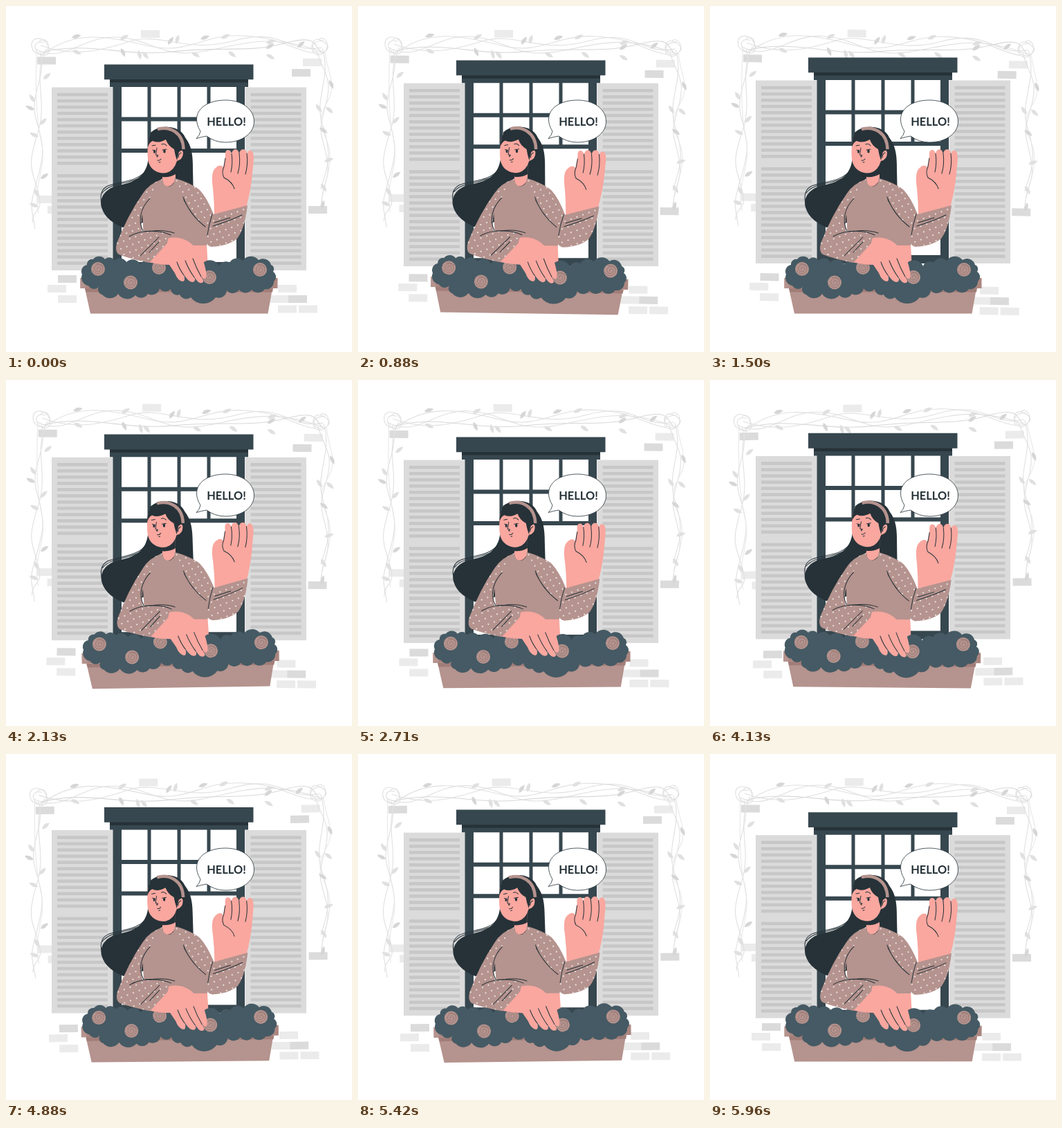
Animation, 500 px wide and 500 px high, one loop 6000 ms. Source, as an HTML page:

```html
<!DOCTYPE html>
<html lang="en">
<head>
<meta charset="utf-8">
<title>Hello from the window</title>
<style>
html, body { margin: 0; width: 100%; height: 100%; overflow: hidden; background: #fff; }
svg { display: block; width: 100vw; height: 100vh; }
.line { fill: none; stroke: #263238; stroke-width: 1; stroke-linecap: round; stroke-linejoin: round; }
.vine { fill: none; stroke: #e0e0e0; stroke-width: 1.1; }
.skin { fill: #f9a79f; }
.cloth { fill: #b5938e; }
.hair { fill: #263238; }
.frame { fill: #37474f; }
text { font: 700 16.4px Lato, "Open Sans", sans-serif; fill: #263238; text-anchor: middle; }
</style>
</head>
<body>
<svg viewBox="0 0 500 500">
  <defs>
    <pattern id="dots" width="14" height="12" patternUnits="userSpaceOnUse" patternTransform="rotate(20)">
      <g fill="#fff"><circle cx="3" cy="3" r=".95"/><circle cx="10" cy="9" r=".95"/></g>
    </pattern>
    <path id="leftSleeve" d="M226 250Q206 257 197 272Q176 302 160 343Q157 355 163 359Q181 366 207 371L233 343L236 329Q216 321 197 327Q191 305 207 279Z"/>
    <path id="rightSleeve" d="M243 249Q270 257 280 266Q291 278 300 301L349 288Q345 322 334 336Q321 347 297 348Q289 346 289 338L290 320Q269 306 257 277Z"/>
  </defs>

  <g id="wall">
    <g id="bricks"></g>
    <g class="vine">
      <path d="M44 63C85 83 109 44 158 45S225 76 283 66S380 38 455 66"/>
      <path d="M50 57C94 72 127 68 176 52S260 70 330 50S408 70 456 60"/>
      <path d="M59 66C100 37 142 42 203 57S282 40 342 43S410 63 445 68"/>
      <path d="M52 67C120 50 167 74 240 66S350 68 402 54S442 58 458 68" stroke="#d8d8d8"/>
      <path d="M48 51C58 43 66 58 58 66S37 68 37 56S55 43 61 58S50 75 44 65S46 50 55 53"/>
      <path d="M452 48C461 42 469 57 461 66S440 69 442 57S454 47 463 55S451 74 445 64S448 51 459 50"/>
      <path d="M49 66C60 104 32 127 44 166S55 216 44 255S37 288 42 322"/>
      <path d="M58 62C37 104 61 135 46 183S36 233 46 267S39 290 38 313"/>
      <path d="M44 62C43 111 42 157 51 196S38 256 47 300" stroke="#e8e8e8"/>
      <path d="M449 65C459 99 473 102 462 143S454 178 463 216S451 260 458 294"/>
      <path d="M457 61C471 105 444 132 458 174S465 233 455 264"/>
      <path d="M461 65C464 97 478 111 466 135S450 164 463 193S462 249 455 285" stroke="#e8e8e8"/>
    </g>
    <g id="leaves"></g>
  </g>

  <g id="window">
    <g id="shutters"></g>
    <path fill="#fff" d="M160 112h180v265H160z"/>
    <path class="frame" d="M142 84.4h215.5v21.8H142zM150 106h200v11H150zM154.500 116h12.500v266h-12.500zM333 116h12v266h-12zM160 370h180v12H160zM204.500 116h5v92h-5zM247.500 116h5v92h-5zM290.500 116h5v92h-5zM166 160.500h168v6H166zM166 206h168v6H166z"/>
    <path class="hair" d="M150 106h200v4.500H150z"/>
  </g>

  <g id="sway">
    <path class="hair" d="M209 183C221 171 251 171 259 190C269 203 270 217 270 236L271 281L224 300L177 323C155 316 142 305 138 291C134 276 145 263 163 259C191 254 204 243 206 218Z"/>
    <path class="line" d="M203 236C193 254 164 253 147 260C135 266 135 279 141 294M196 247C173 259 151 255 139 270"/>
    <path class="skin" d="M246 341L290 343L291.500 372H245zM226 232L245 228V251Q240 262 230 261Q226 257 226 250z"/>
    <path class="hair" d="M226 241Q239 241 245 228V243Q237 248 226 247z"/>
    <path class="cloth" d="M226 249Q226 260 235 261Q244 259 244 249Q271 256 284 272L300 302L290 346H232L199 335L196 282Z"/>

    <path class="skin" d="M206 193Q203 216 206 226C210 239 223 243 232 241Q243 238 247 224Q256 222 256 212Q255 206 249 208L247 184Q217 180 206 193z"/>
    <path class="hair" d="M205 204C205 189 211 177 227 175C250 173 258 188 258 210Q255 206 250 211L247 223Q244 214 243 207Q234 202 231 193Q220 199 212 195Q207 197 205 204z"/>
    <path fill="none" stroke="#b5938e" stroke-width="4.500" d="M219 178C237 173 256 183 256.500 207"/>
    <path class="line" d="M211 202L216 201M225 200Q229 198 232 202M218 205L216.500 215L220 216M219 223Q222 224 224 221M221 226L223 225.500M249 219Q249 214 253 212M212 208L216 209M226 208L232 207"/>
    <g class="hair"><ellipse cx="214.500" cy="210.500" rx="1.500" ry="2.300"/><ellipse cx="229" cy="210" rx="1.700" ry="2.500"/><path d="M217 217L220 216L219 219z"/></g>

    <path class="skin" d="M301 302Q301 282 299 263Q296 243 301 236Q309 227 314 233L317 217Q316 208 321 208Q325 208 326 214Q327 207 332 207Q336 208 337 214Q338 207 343 207Q348 208 348 214Q350 208 354 209Q358 210 358 221L355 252Q352 274 347 291z"/>
    <path class="line" d="M326 213Q328 227 325 240M337 213Q339 229 335 242M348 213Q350 229 346 243M317 220L315 232Q311 241 315 248Q327 254 330 264"/>
    <use href="#rightSleeve" class="cloth"/><use href="#rightSleeve" fill="url(#dots)"/>
    <path class="line" d="M256 276Q265 301 288 319M257 280Q264 294 271 302M298 301Q293 316 291 331M301 313L324 306M299 318Q322 311 341 302"/>

    <path fill="#ab8680" d="M107.500 393H392.500V408H107.500z"/>
    <path class="cloth" d="M107.500 393H115V408H385V408L378.500 444.400H122L114 408H107.500z"/>
    <path fill="#a17d78" d="M114 408H386L385 413.500H115.500z"/>
    <path id="bush" fill="#455a64"/>
    <g id="roses"></g>

    <path class="skin" d="M232 336Q251 331 266 342Q277 350 286 371Q291 388 289 393Q286 396 281 390Q288 399 283 400Q278 402 272 391Q275 399 269 399Q264 399 257 388Q260 398 255 398Q248 397 244 386L236 374Q223 374 205 370z"/>
    <path class="line" d="M247 370Q251 381 257 389M259 368Q264 381 272 392M270 365Q275 379 282 391"/>
    <use href="#leftSleeve" class="cloth"/><use href="#leftSleeve" fill="url(#dots)"/>
    <path class="line" d="M208 278C195 291 190 310 198 325M178 333Q192 325 212 325Q229 323 243 328M201 326Q224 324 238 331M194 361L221 334M207 356L221 341"/>
  </g>

  <path fill="#fff" stroke="#263238" stroke-width=".8" d="M281 181C265 155 286 136 317 136C341 136 358.500 149 358.500 167C358.500 184 341 197 317 197Q302 197 290 188Q283 189 275 191.500Q280 187 281 181z"/>
  <text x="318.500" y="172.800">HELLO!</text>
</svg>
<script>
const $ = id => document.getElementById(id);
const rect = (x, y, w, h, fill) => `<rect x="${x}" y="${y}" width="${w}" height="${h}" fill="${fill}"/>`;

const paleBricks = [[195, 35], [429, 76], [45, 274], [60, 289], [60, 403], [75, 418], [393, 403], [381, 418], [393, 432.5], [423, 432.5]];
const greyBricks = [[45, 73.5], [413, 91], [75, 389], [408, 418], [437, 289]];
const bricks = (list, fill) => list.map(([x, y]) => rect(x, y, 27, 11, fill)).join('');
$('bricks').innerHTML = bricks(paleBricks, '#ebebeb') + bricks(greyBricks, '#dbdbdb');

// Leaf stem position and direction in degrees
const leaves = [
  [95, 46, -15], [96, 64, 25], [165, 49, -30], [166, 61, 65], [191, 64, 75], [197, 66, 50], [234, 56, -55],
  [246, 55, -75], [268, 67, 30], [281, 48, -20], [311, 47, -25], [321, 66, 35], [376, 62, -35], [376, 54, -20],
  [376, 70, 30], [421, 60, -40], [54, 106, -40], [42, 139, -125], [41, 150, -155], [47, 189, -155], [49, 172, -45],
  [50, 250, -35], [47, 276, -115], [47, 290, -160], [467, 107, 65], [462, 146, 40], [456, 153, -125],
  [453, 176, 35], [460, 225, -20], [455, 257, 55], [456, 294, -75]
];
$('leaves').innerHTML = leaves.map(([x, y, a], i) =>
  `<path fill="${i % 3 ? '#e0e0e0' : '#d6d6d6'}" transform="translate(${x} ${y}) rotate(${a})" d="M0 0Q6 -6 14 0Q6 5 0 0"/>`).join('');

const shutter = x => {
  let s = rect(x, 117.5, 88.5, 264.5, '#dbdbdb');
  for (let i = 0; i < 28; i++) if (i !== 12) s += rect(x + 8, 125.8 + i * 9.02, 73, 4.6, '#c7c7c7');
  return s;
};
$('shutters').innerHTML = shutter(66) + shutter(345.5);

// Cusps of the foliage, joined by outward arcs
const cusps = [
  [110, 388], [117, 374], [126, 366], [143, 366], [157, 368], [174, 370], [194, 373], [215, 372], [239, 371],
  [262, 371], [285, 371], [308, 376], [323, 371], [342, 368], [365, 367], [383, 374], [386, 384], [387, 398],
  [374, 409], [355, 410], [337, 410], [319, 411], [303, 421], [267, 421], [251, 417], [238, 409], [222, 408],
  [205, 416], [187, 418], [162, 416], [139, 417], [134, 406], [119, 404]
];
$('bush').setAttribute('d', 'M' + cusps[0] + cusps.map((p, i) => {
  const q = cusps[(i + 1) % cusps.length];
  const r = Math.hypot(q[0] - p[0], q[1] - p[1]) * 0.62;
  return `A${r} ${r} 0 0 1 ${q}`;
}).join('') + 'Z');

$('roses').innerHTML = [[133, 380], [180, 399.5], [221, 378], [294, 392], [367, 381]].map(([x, y]) =>
  `<g transform="translate(${x} ${y})"><circle r="10" fill="#b5938e"/>
  <path fill="none" stroke="#8e716d" stroke-width=".7" d="M-1 1Q-3 -3 2 -3Q6 1 1 4Q-7 4 -5 -3Q0 -9 6 -4Q9 3 2 7Q-5 8 -8 2M-4 -7Q4 -9 8 -3"/></g>`).join('');

// Linear swing 0, 1, 0, -1, 0 over one period
const swing = (t, period) => 1 - 4 * Math.abs((t / period + 0.25) % 1 - 0.5);
const move = (id, value) => $(id).setAttribute('transform', value);

function draw(now) {
  const t = now % 6000;
  move('wall', `rotate(${swing(t, 6000)} 250 250)`);
  move('window', `translate(0 ${-10 * Math.abs(swing(t, 6000))})`);
  move('sway', `rotate(${swing(t, 3000)} 250 250)`);
  requestAnimationFrame(draw);
}
draw(performance.now());
</script>
</body>
</html>
```
